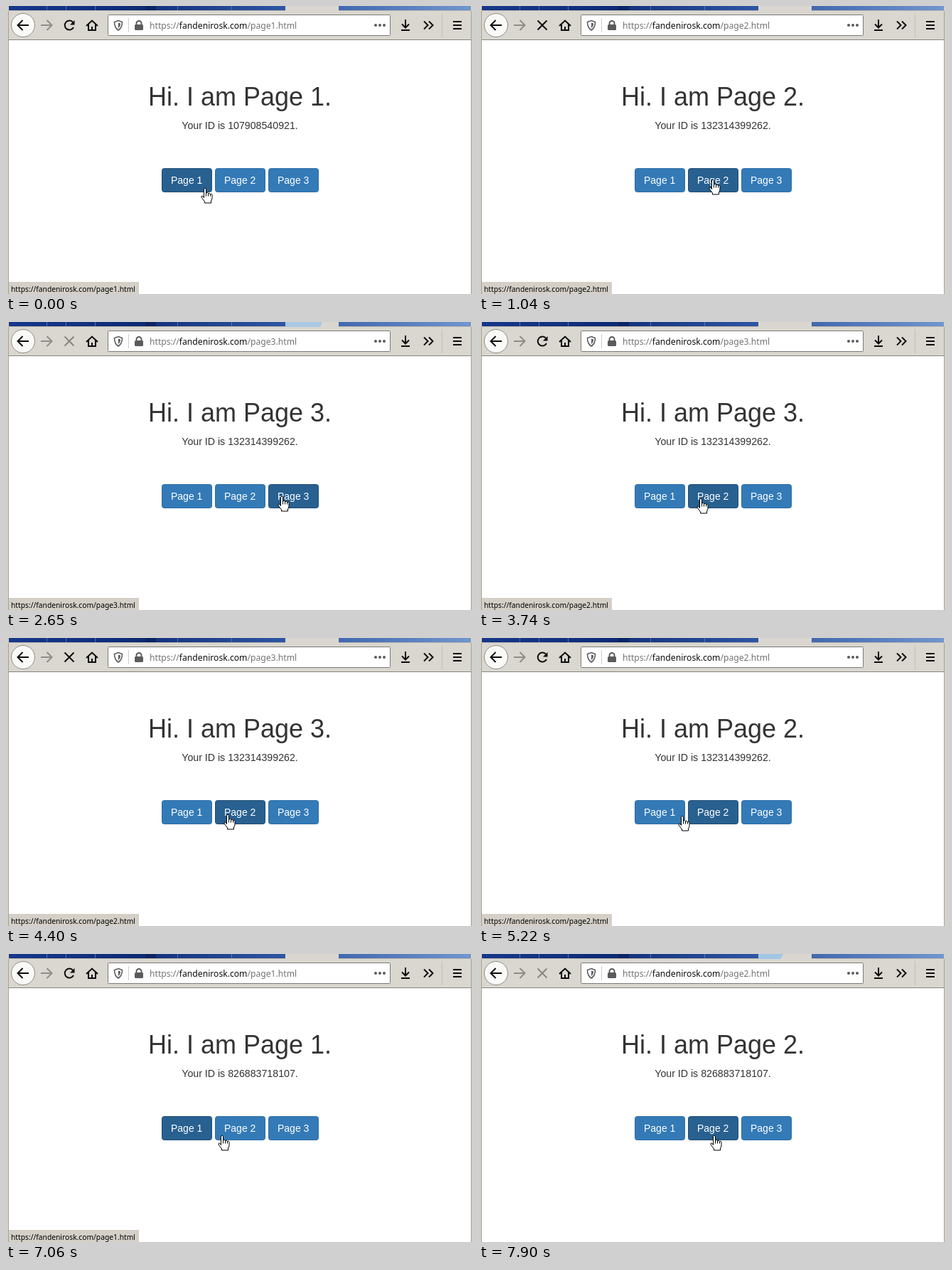
An HTML page that plays this animation: 657x405 px, repeating every 8000 ms.

```html
<!DOCTYPE html>
<html lang="en">
<head>
<meta charset="utf-8">
<title>Page navigation</title>
<style>
html, body { margin: 0; width: 100%; height: 100%; overflow: hidden; background: #fff }
svg { display: block; width: 657px; height: 405px }
text { font-family: "Liberation Sans", Arial, sans-serif; font-size: 14px; fill: #333; white-space: pre }
.ui { font-family: "Noto Sans", "Open Sans", sans-serif; font-size: 12.15px; fill: #737373 }
.mid { text-anchor: middle }
.line { fill: none; stroke: #0c0c0d; stroke-width: 2 }
.btn rect { fill: #337ab7; stroke: #2e6da4 }
.btn text { fill: #fff }
.btn.on rect { fill: #286090; stroke: #204d74 }
</style>
</head>
<body>
<svg viewBox="0 0 657 405">
  <defs>
    <linearGradient id="title">
      <stop offset="0" stop-color="#17388a"/>
      <stop offset=".29" stop-color="#0d2a74"/>
      <stop offset=".31" stop-color="#14327c"/>
      <stop offset=".6" stop-color="#2f56a4"/>
      <stop offset="1" stop-color="#7195cd"/>
    </linearGradient>
    <clipPath id="tab"><path d="M393 0H468V7H393z"/></clipPath>
  </defs>

  <!-- window frame and tab strip -->
  <path d="M0 0H657V405H0z" fill="#d4d0c8"/>
  <path d="M4 0H654V6H4z" fill="url(#title)"/>
  <path d="M57.5 0V6M84.5 0V6M125.5 0V6M241.5 0V6M317.5 0V6" stroke="#7f96c4" stroke-opacity=".6"/>
  <path d="M196 0H211V6H196z" fill="#081c56" fill-opacity=".6"/>
  <path d="M4 6H654V47H4z" fill="#dad7d0"/>
  <path d="M4 6.5H393M468 6.5H654" stroke="#b9b6b0"/>
  <path d="M393 0H468V8H393z" fill="#dad7d0"/>
  <circle id="burst" cx="398" cy="-12" fill="#8fc0ee" clip-path="url(#tab)"/>
  <path d="M4 48H654V405H4z" fill="#fff"/>
  <path d="M4 47.5H654" stroke="#85837f"/>
  <path d="M3.5 7V405M654.5 7V405" stroke="#a5a29c"/>

  <!-- toolbar -->
  <circle cx="24" cy="27" r="16.5" fill="#f9f9f8" stroke="#8f8d89"/>
  <path class="line" d="M32 27H17M23.5 20L16.5 27L23.5 34"/>
  <path class="line" d="M49 27H64M57.5 20L64.5 27L57.5 34" style="stroke:#8e8c88"/>
  <g id="reload" class="line">
    <path d="M94.3 23A6.5 6.5 0 1 0 95 30"/>
    <path d="M96.5 20V26.5H90z" fill="#0c0c0d" stroke="none"/>
  </g>
  <path id="stop" class="line" d="M82.5 20.5L95.5 33.5M95.5 20.5L82.5 33.5"/>
  <path class="line" d="M113 28L121 20.5L129 28M116 26V34H126V26M121 34V29"/>
  <rect x="143.5" y="12.5" width="397" height="29" rx="1" fill="#fff" stroke="#7c7a77"/>
  <path class="line" d="M158 20.5L163.5 22.5C163.5 28 162 31.5 158 34C154 31.5 152.5 28 152.5 22.5z" style="stroke:#5b5b5e;stroke-width:1.6"/>
  <path d="M158 23.5L161 24.5Q161 28.5 158 31z" fill="#5b5b5e"/>
  <path d="M172.5 17V37" stroke="#cfcdca"/>
  <rect x="181" y="26" width="12" height="8" rx="1.5" fill="#5b5b5e"/>
  <path class="line" d="M183.5 27V24.5A3.5 3.5 0 0 1 190.5 24.5V27" style="stroke:#5b5b5e"/>
  <text class="ui" x="202" y="32">https://<tspan fill="#0c0c0d">fandenirosk.com</tspan>/page<tspan id="url"></tspan>.html</text>
  <g fill="#5b5b5e"><circle cx="520" cy="27" r="2"/><circle cx="526" cy="27" r="2"/><circle cx="532" cy="27" r="2"/></g>
  <path class="line" d="M562 19V30M557 25.5L562 30.5L567 25.5M556 34H568"/>
  <path class="line" d="M588 21.5L593.5 27L588 32.5M595 21.5L600.5 27L595 32.5"/>
  <path d="M613.5 10V44" stroke="#c3c0ba"/>
  <path class="line" d="M629 22H641M629 27H641M629 32H641"/>

  <!-- page -->
  <text id="head" class="mid" x="329" y="140" style="font-size:36px"></text>
  <text id="id" class="mid" x="329" y="173" style="font-size:14.2px"></text>
  <g id="buttons"></g>
  <g id="status">
    <path d="M4 388H187V405H4z" fill="#d4d0c8"/>
    <text class="ui" x="7" y="402" style="font-size:10.26px;fill:#000">https://fandenirosk.com/page<tspan id="link"></tspan>.html</text>
  </g>
  <g id="hand" stroke="#000" stroke-linejoin="round">
    <path fill="#fff" d="M-1.5 13.5V1.5Q-1.5 .5 0 .5T1.5 1.5V7Q3.5 5.5 4.5 7.5Q6.5 6.5 7.5 8.5Q9.5 7.5 10 9.5V14Q10 16 8.5 18V21H-.5V19L-5 13Q-5.5 10.5 -3.5 11z"/>
    <path d="M1.5 7V11.5M4.5 7.5V11.5M7.5 8.5V11.5"/>
  </g>
</svg>
<script>
const $ = id => document.getElementById(id);
const LOOP = 8000, TICK = 130;

// cursor path: time, x, y of the fingertip
const path = [
  [0, 280, 256], [390, 329, 246], [910, 329, 244], [1170, 329, 244], [1690, 386, 247],
  [2600, 388, 245], [3120, 388, 245], [3640, 312, 248], [5070, 312, 248], [5200, 286, 250],
  [5590, 258, 252], [6240, 268, 254], [6890, 268, 254], [7020, 304, 255], [7280, 331, 255]
];

// page loads: click, new content, finished; quiet hides the link status for a moment
const loads = [
  { click: -3000, commit: -3000, done: -3000, page: 1, id: "107908540921" },
  { click: 400, commit: 800, done: 1100, page: 2, id: "132314399262" },
  { click: 2110, commit: 2400, done: 2500, page: 3, id: "132314399262" },
  { click: 4280, commit: 4440, done: 4480, page: 2, id: "132314399262", quiet: 250 },
  { click: 5700, commit: 5950, done: 6050, page: 1, id: "826883718107", quiet: 250 },
  { click: 7350, commit: 7700, done: 7800, page: 2, id: "826883718107", quiet: 300 }
];

$("buttons").innerHTML = [1, 2, 3].map(n => {
  const x = 144 + 75 * n;
  return `<g class="btn"><rect x="${x + .5}" y="228.5" width="70" height="33" rx="3"/>
    <text x="${x + 13}" y="250">Page ${n}</text></g>`;
}).join("");
const buttons = [...document.querySelectorAll(".btn")];

function cursor(t) {
  const i = path.findIndex(p => p[0] > t);
  if (i < 0) return path[path.length - 1].slice(1);
  if (i === 0) return path[0].slice(1);
  const [t0, x0, y0] = path[i - 1], [t1, x1, y1] = path[i];
  const k = (t - t0) / (t1 - t0);
  return [x0 + (x1 - x0) * k, y0 + (y1 - y0) * k].map(Math.round);
}

const show = (id, on) => $(id).style.display = on ? "" : "none";

function draw(t) {
  const step = Math.floor(t / TICK) * TICK;
  const [x, y] = cursor(step);
  $("hand").setAttribute("transform", `translate(${x} ${y})`);

  // hover follows the cursor one tick late
  const over = Math.floor((cursor(step - TICK)[0] - 219) / 75) + 1;
  buttons.forEach((b, i) => b.classList.toggle("on", i + 1 === over));
  $("link").textContent = over;

  const now = loads.filter(l => l.commit <= t).pop();
  $("url").textContent = now.page;
  $("head").textContent = `Hi. I am Page ${now.page}.`;
  $("id").textContent = `Your ID is ${now.id}.`;
  show("status", !(t - now.commit < now.quiet));

  const last = loads.filter(l => l.click <= t).pop();
  const age = t - last.done;
  show("stop", age < 450);
  show("reload", age >= 450);
  $("stop").style.opacity = age < 0 ? 1 : .4;
  $("reload").style.opacity = age < 730 ? .4 : 1;

  const lit = age >= 0 && age < 400;
  show("burst", lit);
  if (lit) {
    $("burst").setAttribute("r", age * .32);
    $("burst").style.opacity = 1 - age / 400;
  }
}

function frame() {
  draw(performance.now() % LOOP);
  requestAnimationFrame(frame);
}
frame();
</script>
</body>
</html>
```
